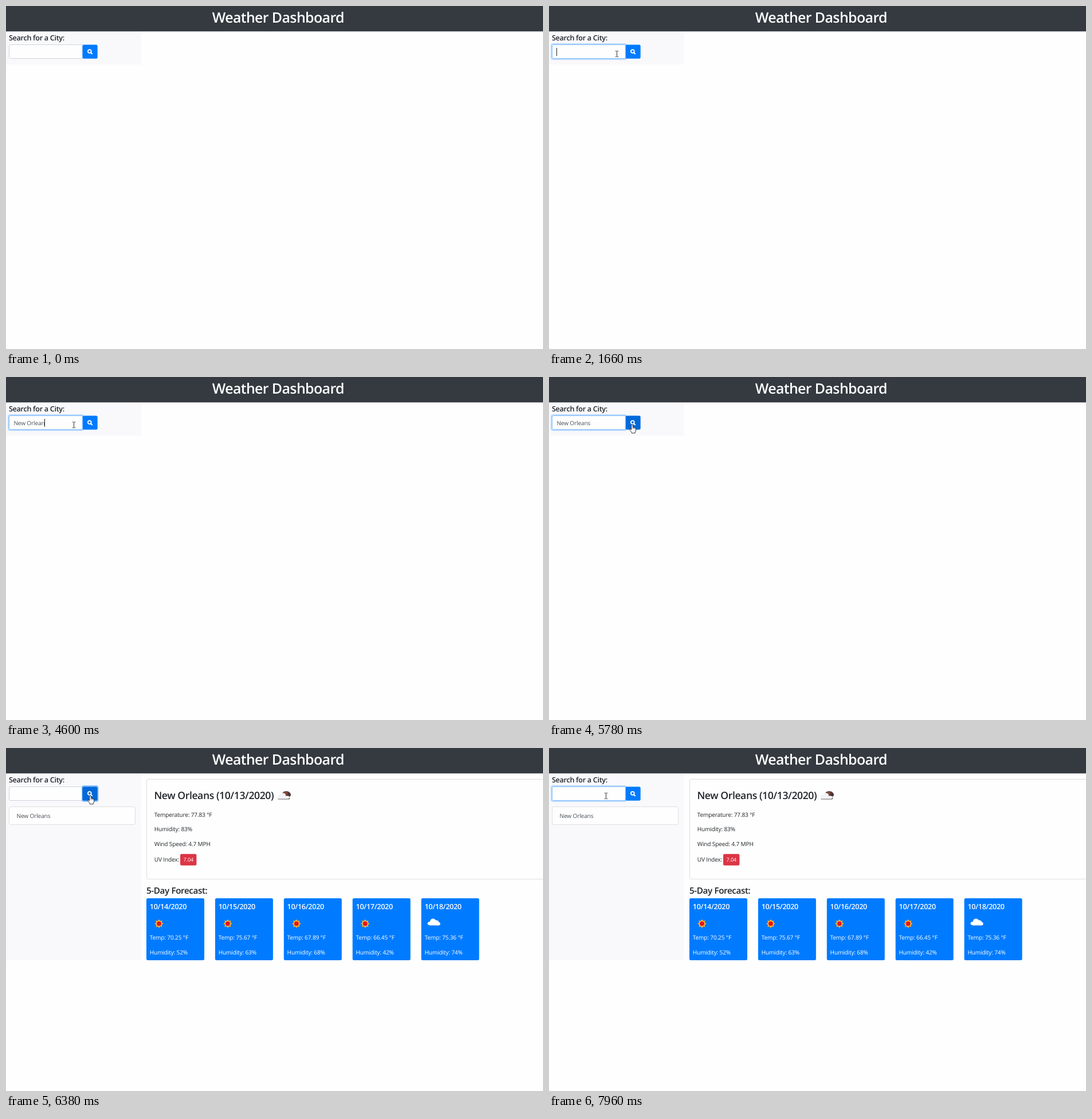
An HTML page with a canvas that plays this animation: 937 px wide and 598 px high, repeating every 8000 ms.

```html
<!DOCTYPE html>
<html lang="en">
<head>
<meta charset="utf-8">
<title>Weather Dashboard</title>
<style>
html, body { margin: 0; width: 100%; height: 100%; overflow: hidden; background: #fefefe; }
canvas { display: block; width: 937px; height: 598px; }
</style>
</head>
<body>
<canvas id="stage"></canvas>
<script>
const W = 937, H = 598, LOOP = 8000;
const BLUE = '#007bff', INK = '#212529', GREY = '#495057', PAGE = '#fefefe';
const canvas = document.getElementById('stage');
const dpr = window.devicePixelRatio || 1;
canvas.width = Math.round(W * dpr);
canvas.height = Math.round(H * dpr);
const c = canvas.getContext('2d');

const QUERY = 'New Orleans';
const KEY_TIMES = [2580, 2900, 2980, 3130, 3450, 3840, 4070, 4250, 4310, 4600, 4770];
const CARET_ON = [[1580, 2120], [2580, 5300], [7480, 7960]];
const CLICK = 5850, LISTED = 6080, CURRENT = 6310, FORECAST = 6380;
const FOCUS_1 = 1500, FOCUS_2 = 7400, FADE = 150;

// Pointer path: time, x, y
const PATH = [
  [490, 888, 590], [1110, 139, 109], [1270, 128, 90], [1500, 118, 83],
  [5560, 118, 83], [5780, 146, 83], [5930, 147, 83],
  [6490, 147, 83], [6770, 99, 83]
];

const DAYS = [
  ['10/14/2020', '70.25', 52], ['10/15/2020', '75.67', 63], ['10/16/2020', '67.89', 68],
  ['10/17/2020', '66.45', 42], ['10/18/2020', '75.36', 74]
];

const ARROW = new Path2D('M.4 .4V10.9L2.8 8.7 4.4 12.4 6 11.7 4.4 8.1 7.6 7.9Z');
const HAND = new Path2D('M-1.3 8V1.1Q-1.3 0 0 0T1.3 1.1V4.6Q2.4 4 3.2 5.1 4.4 4.5 5 5.6 6.4 5.3 6.6 6.8V10Q6.4 12 5.2 13V14.8H-.9V13.4L-3.8 9.3Q-4.6 7.8-3.4 7.4-2.5 7.2-1.3 9Z');

const clamp = v => Math.max(0, Math.min(1, v));
const fade = (t, start) => { const k = clamp((t - start) / FADE); return 1 - (1 - k) * (1 - k); };

// The screen refreshes in even steps while things move.
const snap = t => 490 + Math.floor((t - 465) / 77.7) * 77.7;

function text(str, x, y, size, color = INK, bold = false) {
  c.font = `${bold ? 600 : 400} ${size}px "Open Sans", "Noto Sans", sans-serif`;
  c.letterSpacing = `${size * (bold ? -0.024 : -0.015)}px`;
  c.fillStyle = color;
  c.fillText(str, x, y);
  return c.measureText(str).width;
}

function box(x, y, w, h, fill, r = 2.5) {
  c.beginPath();
  c.roundRect(x, y, w, h, r);
  c.fillStyle = fill;
  c.fill();
}

function outlined(x, y, w, h, edge, r = 2.5) {
  box(x, y, w, h, PAGE, r);
  c.beginPath();
  c.roundRect(x + 0.5, y + 0.5, w - 1, h - 1, r);
  c.strokeStyle = edge;
  c.lineWidth = 1;
  c.stroke();
}

function ellipse(x, y, rx, ry, fill) {
  c.beginPath();
  c.ellipse(x, y, rx, ry, 0, 0, Math.PI * 2);
  c.fillStyle = fill;
  c.fill();
}

function puffs(x, y, fill) {
  ellipse(x - 6, y + 2.5, 5, 3, fill);
  ellipse(x - 1.5, y - 1, 5, 4.6, fill);
  ellipse(x + 4, y + 1, 4.5, 3.8, fill);
  ellipse(x + 7, y + 3, 4, 2.7, fill);
  box(x - 7, y + 1, 14, 4.6, fill, 2);
}

function cloud(x, y, shade) {
  puffs(x, y + 0.9, shade);
  puffs(x, y, '#fff');
}

function brokenClouds() {
  ellipse(489, 79.8, 7, 4.6, '#5b4140');
  ellipse(493, 81.5, 4, 3.4, '#4b3534');
  ellipse(488, 79, 3.4, 2.6, '#8a4a3a');
  box(474, 85.5, 21.5, 4.3, '#808083', 2.1);
  const white = '#f4f4f5';
  ellipse(478.5, 84.8, 4.6, 3.4, white);
  ellipse(483.5, 82.6, 4.6, 4, white);
  ellipse(490, 85.6, 4.2, 2.4, white);
  box(473.5, 84.3, 20.5, 4.2, white, 2.1);
}

function sun(x, y) {
  c.beginPath();
  for (let i = 0; i < 16; i++) {
    const a = i * Math.PI / 8 - Math.PI / 2, r = i % 2 ? 5.1 : 7.9;
    c.lineTo(x + r * Math.cos(a), y + r * Math.sin(a));
  }
  c.closePath();
  c.fillStyle = '#f8a52b';
  c.fill();
  ellipse(x, y, 5.1, 5.1, '#ffd34d');
  ellipse(x, y, 4, 4, '#e8151b');
}

function input(t, focus) {
  if (focus) box(3, 65, 133, 29, `rgba(0,123,255,${0.25 * focus})`, 4);
  outlined(5, 67, 129, 25, focus > 0.4 ? '#80bdff' : '#ced4da', [2.5, 0, 0, 2.5]);
  const typed = t < LISTED ? QUERY.slice(0, KEY_TIMES.filter(k => k <= t).length) : '';
  const width = text(typed, 13.4, 84, 10.1, GREY);
  if (CARET_ON.some(([a, b]) => t >= a && t < b)) {
    c.fillStyle = '#222';
    c.fillRect(Math.floor(13.4 + width), 73, 1, 14);
  }
}

function button(hover, ring) {
  if (ring) box(132, 65, 29.5, 29, `rgba(38,143,255,${0.5 * ring})`, 4);
  box(133.5, 67.4, 26.2, 24.3, hover ? '#0069d9' : BLUE);
  c.strokeStyle = '#fff';
  c.lineWidth = 1.8;
  c.beginPath();
  c.arc(145.8, 79, 2.9, 0, Math.PI * 2);
  c.stroke();
  c.lineWidth = 2;
  c.beginPath();
  c.moveTo(148, 81.2);
  c.lineTo(150.7, 83.9);
  c.stroke();
}

function sidebar(t, p) {
  const height = t >= FORECAST ? 370 : t >= CURRENT ? 238 : t >= LISTED ? 144 : 102;
  c.fillStyle = '#f9f9fc';
  c.fillRect(0, 44, 236, height - 44);
  text('Search for a City:', 5, 60, 12.6, INK, true);

  const focus = t < CLICK ? fade(t, FOCUS_1) : t < FOCUS_2 ? 1 - fade(t, CLICK) : fade(t, FOCUS_2);
  const ring = t < CLICK ? 0 : t < FOCUS_2 ? fade(t, CLICK) : 1 - fade(t, FOCUS_2);
  const hover = p && p.kind === 'hand';
  const inputOnTop = focus > 0 && (t < CLICK || t >= FOCUS_2);
  if (inputOnTop) button(hover, ring);
  input(t, focus);
  if (!inputOnTop) button(hover, ring);

  if (t >= LISTED) {
    outlined(5, 102, 221, 32, '#dfdfe0');
    text(QUERY, 18.6, 122, 10.1, GREY);
  }
}

function current() {
  outlined(245, 54, 720, 175, '#dfdfdf');
  text('New Orleans (10/13/2020)', 258.5, 88.5, 17.6, INK, true);
  brokenClouds();
  ['Temperature: 77.83 °F', 'Humidity: 83%', 'Wind Speed: 4.7 MPH']
    .forEach((s, i) => text(s, 258.7, 119.5 + i * 25.7, 10.1));
  text('UV Index:', 258.7, 198, 10.1);
  box(304, 184.7, 28.4, 20, '#dc3545');
  text('7.04', 309.6, 198.3, 9.1, '#fff');
}

function forecast() {
  text('5-Day Forecast:', 245, 254, 15.2, INK, true);
  DAYS.forEach(([date, temp, humidity], i) => {
    const x = 245 + i * 119.9;
    box(x, 262, 101, 108, BLUE);
    text(date, x + 5.8, 280.5, 12.6, '#fff', true);
    if (i < 4) sun(x + 22, 306.3);
    else cloud(x + 22, 303, '#d5dbe2');
    text(`Temp: ${temp} °F`, x + 5.8, 334.3, 10.1, '#fff');
    text(`Humidity: ${humidity}%`, x + 5.8, 360, 10.1, '#fff');
  });
}

function pointer(t) {
  if (t < 490) return null;
  const s = Math.max(490, snap(t));
  let i = 0;
  while (i < PATH.length - 2 && s >= PATH[i + 1][0]) i++;
  const [t0, x0, y0] = PATH[i], [t1, x1, y1] = PATH[i + 1];
  let k = clamp((s - t0) / (t1 - t0));
  if (i === 0) k = 1 - (1 - k) * (1 - k);
  const x = x0 + (x1 - x0) * k, y = y0 + (y1 - y0) * k;
  const inRow = y >= 67 && y < 92;
  const kind = !inRow || x > 160 ? 'arrow' : x >= 134 ? 'hand' : 'beam';
  return { x, y, kind };
}

function drawPointer({ x, y, kind }) {
  c.save();
  c.translate(Math.round(x), Math.round(y));
  c.lineJoin = 'round';
  if (kind === 'beam') {
    c.fillStyle = '#333';
    c.fillRect(0, -4, 1, 9);
    for (const end of [-5, 5]) {
      c.fillRect(-2, end, 2, 1);
      c.fillRect(1, end, 2, 1);
    }
  } else {
    const shape = kind === 'hand' ? HAND : ARROW;
    c.fillStyle = '#fff';
    c.strokeStyle = '#222';
    c.lineWidth = 0.9;
    c.fill(shape);
    c.stroke(shape);
    if (kind === 'hand') {
      c.beginPath();
      for (const px of [1.3, 3.2, 5]) {
        c.moveTo(px, 5);
        c.lineTo(px, 7.5);
      }
      c.lineWidth = 0.6;
      c.stroke();
    }
  }
  c.restore();
}

function draw(t) {
  c.setTransform(dpr, 0, 0, dpr, 0, 0);
  c.textRendering = 'geometricPrecision';
  c.fillStyle = PAGE;
  c.fillRect(0, 0, W, H);

  const p = pointer(t);
  sidebar(t, p);
  c.fillStyle = '#343a40';
  c.fillRect(0, 0, W, 44.3);
  text('Weather Dashboard', 359.7, 28.5, 24.9, '#fff', true);
  if (t >= CURRENT) current();
  if (t >= FORECAST) forecast();
  if (p) drawPointer(p);
}

const start = performance.now();
function frame() {
  draw((performance.now() - start) % LOOP);
  requestAnimationFrame(frame);
}
frame();
</script>
</body>
</html>
```
